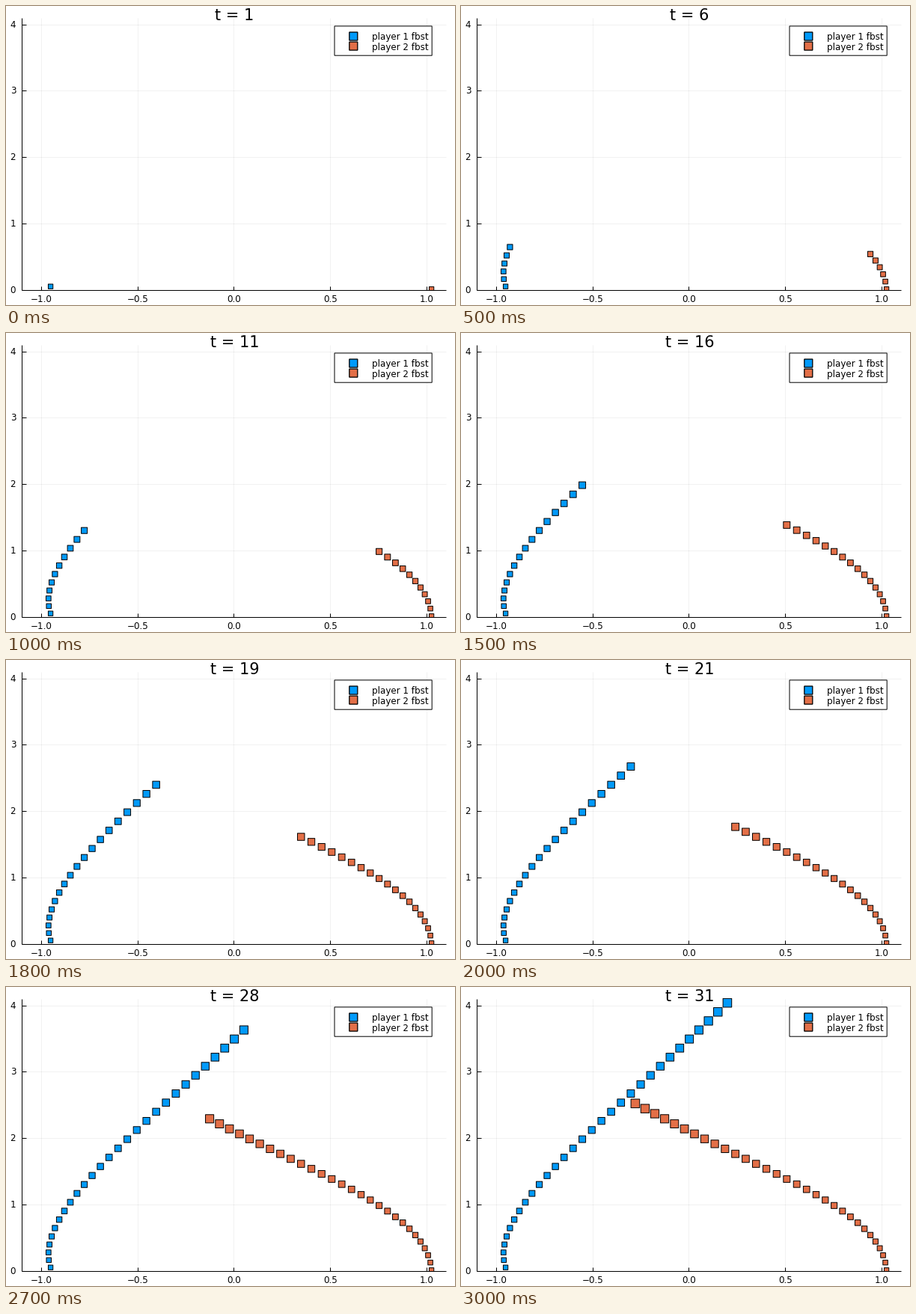
A matplotlib script for the animation above (3.1 s loop, 600 by 400 pixels).

```python
import numpy as np
import matplotlib.pyplot as plt
from matplotlib.animation import FuncAnimation
from matplotlib.patches import Rectangle

W, H, DPI = 600, 400, 100
PT = 72 / DPI  # points per pixel
STEPS = 31
BLUE, ORANGE = "#009AFA", "#E36F47"
LEFT, RIGHT, TOP, BOTTOM = 21.2, 588, 16, 380
X_ZERO, X_HALF, Y_UNIT = 304.4, 128.73, 88.85  # axis scale in pixels

plt.rcParams["font.family"] = "DejaVu Sans"
fig = plt.figure(figsize=(W / DPI, H / DPI), dpi=DPI, facecolor="white")
ax = fig.add_axes([0, 0, 1, 1])
ax.set_xlim(0, W)
ax.set_ylim(H, 0)
ax.axis("off")


def line(x, y, **style):
    ax.plot(x, y, **{"color": "black", "lw": PT, "solid_capstyle": "butt", **style})


def box(x, y, w, h, color, width, zorder):
    ax.add_patch(Rectangle((x, y), w, h, fc=color, ec="black", lw=width * PT,
                           zorder=zorder, snap=False))


def label(x, y, text, size=11.9, **style):
    return ax.text(x, y, text, fontsize=size * PT, va="baseline", **style)


def glide(points):
    """Smooth motion through key points, spaced closer towards both ends."""
    keys = np.round(15 - 15 * np.cos(np.linspace(0, np.pi, len(points))))
    curve = np.polyfit(keys / 15 - 1, points, len(points) - 1)
    time = np.linspace(-1, 1, STEPS)[:, None]
    return np.polyval(curve[:, None], time)


# Grid, ticks and axes
GRID = dict(alpha=0.055, zorder=1)
for i in range(5):
    x = X_ZERO + (i - 2) * X_HALF
    line([x, x], [TOP, BOTTOM], **GRID)
    line([x, x], [BOTTOM, BOTTOM - 5.5])
    label(x, 396, f"{(i - 2) / 2:.1f}".replace("-", "\u2212"), ha="center")

    y = BOTTOM - i * Y_UNIT
    line([LEFT, RIGHT], [y, y], **GRID)
    line([LEFT, LEFT + 5.5], [y, y])
    label(13.2, y + 4, str(i), ha="right")
line([LEFT, RIGHT], [BOTTOM, BOTTOM])
line([LEFT, LEFT], [TOP, BOTTOM])

# Trails
paths = [
    glide([(59.6, 375.2), (58.1, 344.5), (104.6, 264.2),
           (226.9, 142.5), (317.9, 57.5), (355.9, 21.2)]),
    glide([(568.6, 378.8), (559.6, 349.5), (498.6, 292.3),
           (366.6, 223.2), (272.1, 176.3), (232.9, 155.8)]),
]
areas = (np.linspace(6.3, 11.6, STEPS) * PT) ** 2
plot_area = Rectangle((LEFT, TOP - 1), RIGHT - LEFT, BOTTOM - TOP + 1,
                      transform=ax.transData)
trails = []
for color, path in zip((BLUE, ORANGE), paths):
    trail = ax.scatter(*path.T, s=areas, marker="s", color=color,
                       edgecolors="black", linewidths=PT, zorder=4)
    trail.set_snap(False)
    trail.set_clip_path(plot_area)
    trails.append(trail)

# Legend
box(439, 26.9, 130.2, 39.3, "white", 1, 5)
for y, color, name in ((40.5, BLUE, "player 1 fbst"), (53.6, ORANGE, "player 2 fbst")):
    box(464.3 - 5.5, y - 5.5, 11, 11, color, 1.3, 6)
    label(488.8, y + 4.9, name, zorder=6)

title = label(305.5, 18.7, "", size=20.9, ha="center", zorder=6)


def draw(frame):
    count = frame + 1
    title.set_text(f"t = {count}")
    reached = np.arange(STEPS)[:, None] < count
    for trail, path in zip(trails, paths):
        trail.set_offsets(np.where(reached, path, np.nan))
    return [title, *trails]


anim = FuncAnimation(fig, draw, frames=STEPS, interval=100, repeat=True, repeat_delay=0)
plt.show()
```
